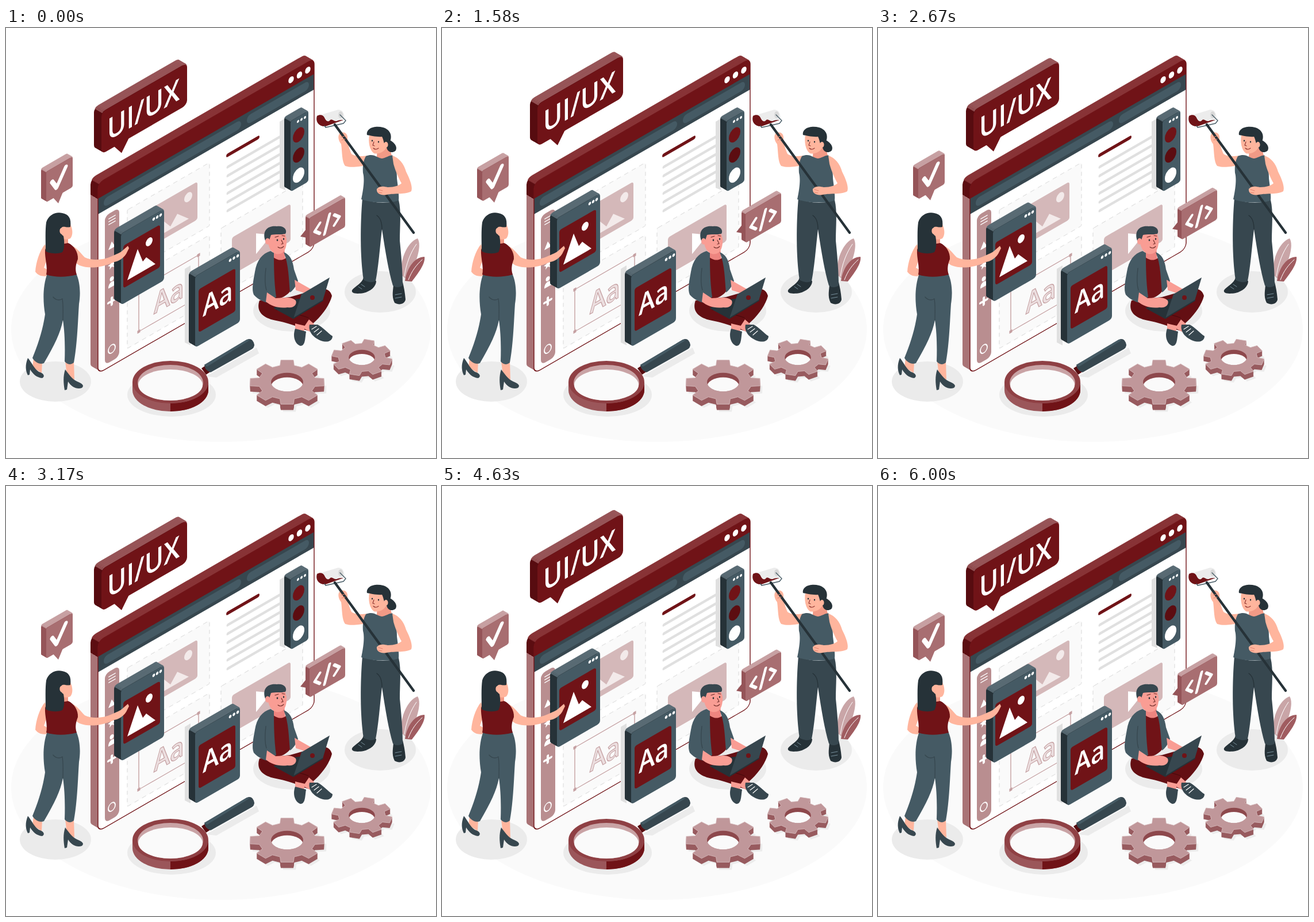
Animation of 748 by 748 pixels, one loop 6040 ms. Source, as an HTML page:

```html
<!DOCTYPE html>
<html lang="en">
<head>
<meta charset="utf-8">
<title>UI/UX</title>
<style>
html, body { margin: 0; width: 100%; height: 100%; overflow: hidden; background: #fff; }
svg { display: block; width: 100vw; height: 100vh; }
text { font-family: "Open Sans", "Noto Sans", sans-serif; font-weight: 600; }
</style>
</head>
<body>
<svg id="stage" viewBox="0 0 748 748"></svg>
<script>
const RED = '#701317', SLATE = '#455a64', DARK = '#37474f', INK = '#263238',
      PINK = '#b98e90', PALE = '#d4b8b9', SKIN = '#ffb59d', ROSY = '#f99d94', GREY = '#e0e0e0';
const TAN = Math.tan(Math.PI / 6);

const path = (d, fill, extra = '') => `<path d="${d}" fill="${fill}" ${extra}/>`;
const line = (d, color, width = 1, extra = '') =>
  path(d, 'none', `stroke="${color}" stroke-width="${width}" stroke-linecap="round" stroke-linejoin="round" ${extra}`);
const oval = (x, y, rx, ry, fill, extra = '') =>
  `<ellipse cx="${x}" cy="${y}" rx="${rx}" ry="${ry}" fill="${fill}" ${extra}/>`;
const rect = (x, y, w, h, r, fill, extra = '') =>
  `<rect x="${x}" y="${y}" width="${w}" height="${h}" rx="${r}" fill="${fill}" ${extra}/>`;
const iso = (x, y, s) => `<g transform="translate(${x} ${y}) skewY(-30)">${s}</g>`;
const label = (x, y, size, s, extra = 'fill="#fff"') =>
  `<text transform="translate(${x} ${y}) scale(.866 1)" font-size="${size}" ${extra}>${s}</text>`;
const dots = (x, y, gap, r) => [0, 1, 2].map(i => oval(x + i * gap, y, r, r * 1.15, '#fff')).join('');
const group = (id, s) => `<g id="${id}">${s}</g>`;

// Isometric slab: the face is swept back to form its left side and top.
function slab(x, y, w, h, depth, [front, side, top], inner, r = 5) {
  const edge = `M${r * .3} ${r * .3}Q${r * .5} 0 ${r} 0H${w - r}Q${w} 0 ${w} ${r}`;
  let sides = '', tops = '';
  for (let d = depth; d > 0; d--) {
    sides += iso(x - d, y - d * TAN, rect(0, 0, w, h, r, side));
    tops += iso(x - d, y - d * TAN, line(edge, top, 1.6));
  }
  return sides + tops + iso(x, y, rect(0, 0, w, h, r, front) + inner);
}

function browser() {
  const dashed = (x, y, w, h) => rect(x, y, w, h, 2, '#fafafa',
    `stroke="${GREY}" stroke-width="1.3" stroke-dasharray="7 6"`);
  const rows = [0, 1, 2, 3, 4, 5].map(i => line(`M226 ${76 + i * 15.2}H326`, GREY, 5)).join('');
  const corners = [[71, 200], [175, 200], [71, 273], [175, 273]]
    .map(([x, y]) => rect(x - 2.5, y - 2.5, 5, 5, 0, '#c5a0a2')).join('');
  const tools =
    [47, 52, 57].map(y => line(`M19 ${y}H30`, '#fff', 1.6)).join('') +
    path('M18 101L24 89L30 101Z', '#fff') +
    path('M24 122l2 5 5 1-4 3 1 5-4-3-4 3 1-5-4-3 5-1Z', '#fff') +
    oval(24, 154, 3.5, 4, '#fff') + path('M18 168Q18 159 24 159Q30 159 30 168Z', '#fff') +
    line('M24 187v12M18 193h12', '#fff', 4) +
    oval(24, 276, 6, 7, 'none', 'stroke="#fff" stroke-width="1.8"');
  return slab(160, 270, 376, 331, 13, ['#fff', 'url(#edge)', '#8a3538'],
    `<g transform="translate(0 26)">` +
    path('M0 2V-16Q0 -26 10 -26H366Q376 -26 376 -16V2Z', RED) +
    rect(0, 1, 376, 27, 0, DARK) +
    rect(10, 7, 239, 15, 7, SLATE) + rect(259, 7, 108, 15, 7, SLATE) +
    dots(336, -12, 14.5, 4.7) +
    rect(12, 38, 25, 259, 8, PINK) + tools +
    dashed(51, 50, 143, 110) + dashed(51, 176, 143, 115) + dashed(214, 176, 142, 115) +
    rect(71, 71, 102, 66, 4, PALE) +
    path('M80 127L104 92L126 122L138 107L158 127Z', '#f3eaea') + oval(157, 89, 7, 8, '#f3eaea') +
    line('M226 55.5H278', RED, 6) + rows +
    rect(233, 203, 102, 65, 4, PALE) + path('M275 220V256L302 238Z', '#fff') +
    rect(71, 200, 104, 73, 0, 'none', 'stroke="#c5a0a2" stroke-width="1.4"') + corners +
    label(97, 258, 49, 'Aa', 'fill="#ecdfe0" stroke="#c5a0a2" stroke-width="1.3"') +
    '</g>' + rect(0, 0, 376, 331, 10, 'none', `stroke="${RED}" stroke-width="1.4"`), 10);
}

const cardTones = [SLATE, INK, '#5b6d76'];
const signal = path('M476 163L486 157V282L476 278Z', GREY) +
  slab(495, 162, 31, 123, 11, cardTones,
    dots(13, 8, 6, 2) + oval(14, 32, 10, 12, RED) + oval(14, 67, 10, 12, '#5c0d11') +
    oval(14, 102, 10, 12, '#fff'), 4);

const imageCard = slab(200, 359, 75, 124, 12, cardTones,
  dots(57, 7, 6, 2.3) + rect(4, 23, 64, 74, 4, RED) +
  path('M11 87L29 43L38 70L44 66L60 87Z', '#fff') + oval(49, 42, 6, 7, '#fff'));
const textCard = slab(329, 433, 78, 124, 11, cardTones,
  dots(61, 7, 6.5, 2.3) + rect(6, 26, 64, 75, 4, RED) + label(13, 78, 49, 'Aa'));

const titleBubble = slab(166, 147, 149, 73, 13, [RED, '#570c10', '#99575a'],
  path('M22 72L35 91L48 72Z', RED) + label(10, 56, 52, 'UI/UX'), 8);
const rose = ['#a86e71', '#955458', '#c9a3a5'];
const checkBubble = slab(70, 251, 46, 53, 9, rose,
  path('M12 52L21 67L29 52Z', rose[0]) + line('M10 23L18 38L34 11', '#fff', 7), 3);
const codeBubble = path('M512 363L527 344V366Z', rose[1]) +
  slab(528, 331, 62, 51, 7, rose,
    line('M18 19L9 28L18 37M35 13L26 43M43 19L52 28L43 37', '#fff', 5), 3);

function gear(x, y, size, thick, turn = 0) {
  const at = (r, a) => `${(r * Math.cos(a)).toFixed(1)} ${(r * Math.sin(a) * .6).toFixed(1)}`;
  const pts = [];
  for (let i = 0; i < 8; i++)
    for (const [r, o] of [[.77, -.25], [1, -.17], [1, .17], [.77, .25]])
      pts.push(at(size * r, i * Math.PI / 4 + o + turn));
  const d = `M${pts.join('L')}Z`, hole = [size * .43, size * .25], id = `hole${x}`;
  let body = `<g transform="translate(4 ${thick + 3})">${path(d, '#ececec')}</g>`;
  for (let k = thick; k > 0; k--)
    body += `<g transform="translate(0 ${k})">${path(d, '#985b5f')}</g>`;
  return `<g transform="translate(${x} ${y})"><clipPath id="${id}">${oval(0, 0, ...hole, '#000')}</clipPath>
    ${body}${path(d, '#c0979a', 'stroke="#d8bfc0" stroke-width=".8"')}
    ${oval(0, 0, ...hole, '#8d484c')}<g clip-path="url(#${id})">${oval(0, thick * .8, ...hole, '#fafafa')}</g></g>`;
}

const lens =
  oval(288, 638, 77, 38, '#ebebeb') + path('M348 606L436 556L440 566L366 608Z', '#ebebeb') +
  path('M220 616V630A66 37 0 0 0 352 630V616Z', '#9b565a') +
  path('M286 653V667A66 37 0 0 0 352 630V616A66 37 0 0 1 286 653Z', RED) +
  oval(286, 616, 66, 37, '#8f4044') + oval(286, 617, 57, 31, '#c9a3a5') +
  oval(286, 621, 56, 27, '#fafafa') +
  path('M340 592L349 586L357 597L348 603Z', '#570c10') +
  path('M345 586L419 542Q429 538 432 551Q432 556 427 559L356 599Q346 596 345 586Z', DARK) +
  path('M345 586L419 542L424 543L350 589Z', SLATE);

const leftWoman =
  path('M68 376C58 388 52 408 51 424C56 431 64 433 73 431L75 422L66 417L73 398Z', SKIN) +
  path('M48 574L63 580L62 600L46 590Z', SKIN) + path('M103 580H118L119 612L106 604Z', SKIN) +
  path('M38 574C33 586 34 596 38 604L41 603L42 594C47 602 53 608 63 609C69 606 65 600 57 598C49 593 45 582 38 574Z', DARK) +
  path('M103 594C99 606 100 618 102 630L106 629L108 615C114 625 124 629 132 626C137 622 132 618 124 615C115 611 109 602 103 594Z', DARK) +
  path('M72 427C90 433 110 432 122 427C129 442 130 462 127 480C125 510 124 550 118 582C112 587 106 585 102 580C103 552 102 528 99 508C95 530 84 552 66 583C58 586 50 581 46 574C56 550 64 525 68 498C64 475 64 448 72 427Z', SLATE) +
  line('M82 468C87 474 94 474 98 471C100 484 99 496 99 508', DARK, 1.3) +
  path('M92 356H108V380H90Z', '#f29a86') +
  path('M110 377C123 381 129 391 137 399C149 405 170 404 184 397C192 393 198 392 204 386L212 379L214 383L209 393C203 402 195 406 188 407C170 416 146 420 128 413C118 408 110 396 108 386Z', SKIN) +
  path('M72 374C85 378 100 376 108 374C118 378 126 390 125 402C121 412 120 420 123 429C104 434 86 434 70 429C73 416 67 400 68 386Z', RED) +
  path('M92 337L112 341C116 350 117 360 112 366C106 369 98 368 92 364Z', SKIN) +
  path('M70 338C74 324 88 319 98 322C109 324 114 331 112 346C106 348 100 344 97 347C92 352 95 358 100 362C102 372 102 384 98 390C88 394 74 392 69 388C69 370 68 352 70 338Z', INK) +
  oval(97, 353, 3.6, 5.5, SKIN);

const laces = line('M532 524L540 519M536 529L544 523M541 534L549 527', '#fff', 1.2);
const man =
  path('M466 382H484L486 404Q474 410 464 400Z', '#ee8580') +
  path('M441 474C434 494 448 505 470 509C490 513 505 518 517 524L530 528L534 514C550 500 563 482 567 466C564 454 552 451 540 455L494 468Z', '#640f13') +
  line('M470 490C492 494 510 498 526 504', '#4a090c', 1.3) +
  path('M517 522L527 507L536 515L528 528Z', ROSY) + path('M503 514L520 518L518 530L503 528Z', ROSY) +
  path('M503 523C498 537 503 550 512 553C521 553 520 540 522 528Z', DARK) +
  path('M528 516C525 528 535 539 548 544C560 548 568 544 568 536C560 531 552 521 542 516Z', DARK) + laces +
  path('M462 396C474 408 486 404 490 396L500 440C500 455 490 468 470 472L456 464Z', RED) +
  path('M483 390C494 394 499 404 501 420L508 440C504 450 500 456 494 460C492 440 492 410 483 390Z', SLATE) +
  path('M460 388C446 392 436 404 433 424C430 440 427 455 431 464C440 474 452 478 457 478L470 468C466 440 466 410 466 391Z', SLATE) +
  line('M452 418C450 434 450 446 453 456', DARK, 1.3) +
  path('M502 438L514 445L530 454L522 462L504 456Z', ROSY) +
  path('M467 487L500 505L516 470L488 474Z', INK) +
  path('M454 460L469 470C481 470 496 466 504 474C507 481 500 488 490 486C474 488 462 484 452 476Z', ROSY) +
  path('M500 505L514 463L563 434L551 474Z', DARK) +
  line('M467 487L500 505L551 474', INK, 2) + oval(533, 469, 4, 4, RED) +
  path('M456 362C454 376 459 390 470 393C483 395 489 384 488 366L484 354L460 354Z', ROSY) +
  path('M451 370C445 352 456 343 471 345C484 343 490 352 486 358C478 360 468 358 461 360L458 369Z', DARK) +
  oval(455, 371, 4, 5.5, ROSY) +
  oval(472, 369, 1.3, 1.7, INK) + oval(483, 367, 1.2, 1.7, INK) +
  line('M468 364l6-2M480 361l5 1M479 369l3 6-3 1M473 381Q478 385 483 380', '#6b2a27', 1.1);

const plant =
  path('M688 430C684 405 698 372 716 366C724 378 714 410 698 438Z', '#c9a5a7') +
  line('M693 432C696 410 704 390 714 376', '#fff', 1) +
  path('M694 440C698 415 712 398 728 398C730 410 716 428 706 441Z', '#a05c60') +
  line('M700 438C706 422 714 412 724 403', '#fff', 1);

const rightWoman =
  path('M646 206H667L672 226Q656 236 645 224Z', '#f29a86') +
  path('M622 434C620 444 606 450 602 456C600 462 610 463 622 461C634 458 644 450 644 440Z', INK) +
  path('M674 444C674 455 670 466 676 478C684 483 694 480 695 472C694 460 692 450 690 442Z', INK) +
  line('M613 450l6 4M618 446l6 4M677 464l11-2M677 470l11-2', '#78909c', 1) +
  path('M620 296C640 306 666 306 683 299C688 320 685 345 685 370C688 400 690 425 690 448C684 452 678 452 673 448C666 425 660 390 654 350C650 385 648 415 643 440C636 444 628 442 622 438C616 400 616 340 620 296Z', DARK) +
  line('M654 350C654 338 651 330 645 326', INK, 1.3) +
  path('M628 222C615 224 606 223 601 219C597 210 594 200 594 190C594 183 588 180 582 182C576 186 578 196 583 202C585 216 584 232 590 240C602 244 616 240 624 240Z', SKIN) +
  path('M626 223C640 217 645 226 654 227C662 226 668 220 673 222C678 232 680 250 680 262C682 278 684 290 683 300C664 306 634 304 618 298C622 280 624 262 621 252C620 240 622 230 626 223Z', SLATE) +
  line('M572 168L709 356', INK, 4.4) +
  path('M672 222C684 226 692 236 696 250C702 262 708 276 705 284C696 290 676 287 662 290C652 292 644 288 645 280C650 274 658 276 664 277C676 277 684 274 688 270C682 260 676 244 674 236Z', SKIN) +
  line('M648 281l7 2M648 286l6 1M583 190l6-2M584 195l6-2', '#e2816d', 1) +
  path('M661 192C672 196 682 204 678 213C672 219 663 216 662 207Z', INK) +
  path('M632 186C630 198 632 212 640 218C648 220 658 216 662 207L664 190L650 182Z', SKIN) +
  path('M628 186C626 174 642 169 656 173C669 177 673 188 667 200L661 206C657 202 657 194 654 189C645 190 634 187 628 186Z', INK) +
  oval(661, 203, 3.6, 5, SKIN) + oval(637, 196, 1.2, 1.6, INK) + oval(648, 198, 1.2, 1.6, INK) +
  line('M640 198l-2 6 3 1M639 209Q643 213 648 209', '#8c302c', 1.1);

const roller =
  path('M541 153L578 142C586 142 590 151 588 159L556 171C544 172 538 163 541 153Z', '#ececec') +
  path('M541 153C546 150 552 151 554 156C557 163 561 164 564 160C567 157 571 163 575 162C579 160 584 160 587 160L556 171C544 172 538 163 541 153Z', RED) +
  oval(582, 151, 4, 6, '#d8d8d8') +
  line('M581 151L591 161L587 166L556 173L554 170', SLATE, 1.4);

document.getElementById('stage').innerHTML =
  `<defs><linearGradient id="edge" x1="0" y1="0" x2="0" y2="1">
    <stop offset=".085" stop-color="#5c0d11"/><stop offset=".085" stop-color="#a97376"/></linearGradient></defs>` +
  oval(374, 524, 365, 196, '#fafafa') +
  [[86, 615, 62, 35], [651, 459, 62, 36], [497, 492, 67, 36]].map(s => oval(...s, '#ebebeb')).join('') +
  browser() + signal + plant +
  group('image', imageCard) +
  path('M311 419L321 413V552L311 547Z', GREY) + group('text', textCard) +
  group('title', titleBubble) + group('check', checkBubble) + group('code', codeBubble) +
  leftWoman + man + roller + rightWoman + lens + gear(489, 616, 65, 10) + gear(619, 573, 53, 9, .25);

const LOOP = 6040;
// id, cycles per loop, rise
const floats = [['title', 2, 15], ['image', 2, 30], ['check', 4, 15], ['text', 4, 15], ['code', 1, 15]]
  .map(([id, cycles, rise]) => [document.getElementById(id), cycles, rise]);

const start = performance.now();
function draw() {
  const t = (performance.now() - start + 40) / LOOP;
  for (const [el, cycles, rise] of floats) {
    const y = rise * (1 - Math.abs(2 * (t * cycles % 1) - 1));
    el.setAttribute('transform', `translate(0 ${-y.toFixed(2)})`);
  }
  requestAnimationFrame(draw);
}
draw();
</script>
</body>
</html>
```
